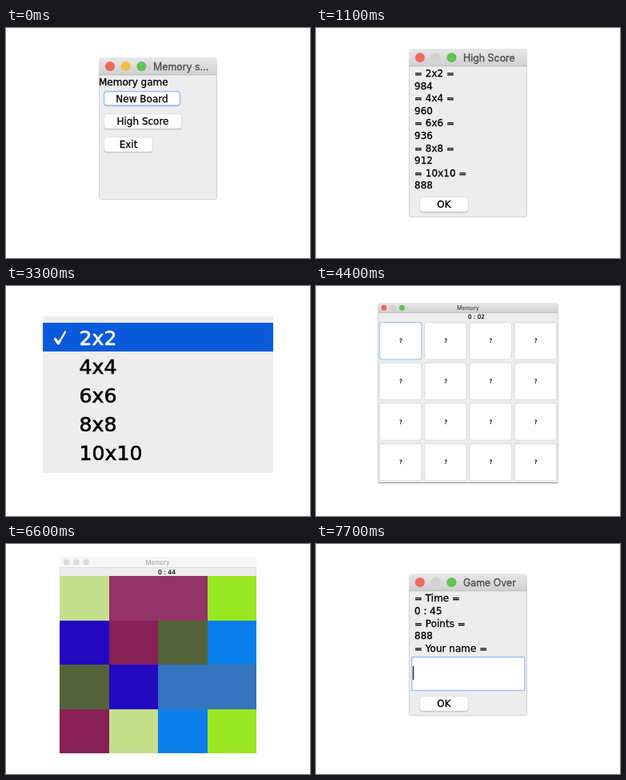
An HTML page with a canvas that plays this animation: 380x288 px, repeating every 8800 ms.

```html
<!DOCTYPE html>
<html lang="en">
<head>
<meta charset="utf-8">
<title>Memory game</title>
<style>
  html, body { margin: 0; width: 100%; height: 100%; overflow: hidden; background: #fff; }
  canvas { display: block; }
</style>
</head>
<body>
<canvas id="stage" width="380" height="288"></canvas>
<script>
const ctx = document.getElementById('stage').getContext('2d');
const SLOT = 1100;
const BODY = '#ededed', RING = '#97c3f5', OFF = '#d1d1d1';
const RED = '#ee6a5f', YELLOW = '#f5bd4f', GREEN = '#61c454';
const UI_FONT = '"DejaVu Sans", sans-serif';
const TITLE_FONT = 'Inter, Roboto, sans-serif';

const PAIRS = ['#c4df8c', '#933366', '#99e622', '#2409c1', '#872055', '#53643a', '#0a7fea', '#3474bc'];
const BOARD = [0, 1, 1, 2, 3, 4, 5, 6, 5, 3, 7, 7, 4, 0, 6, 2];
const SIZES = ['2x2', '4x4', '6x6', '8x8', '10x10'];

// A thin outline gives the interface text its medium weight.
function text(str, x, y, size, { align = 'left', color = '#000', font = UI_FONT } = {}) {
  ctx.font = `${size}px ${font}`;
  ctx.textAlign = align;
  ctx.fillStyle = ctx.strokeStyle = color;
  ctx.lineWidth = size * .025;
  ctx.fillText(str, x, y);
  ctx.strokeText(str, x, y);
}

function rect(x, y, w, h, color) {
  ctx.fillStyle = color;
  ctx.fillRect(x, y, w, h);
}

function box(x, y, w, h, radius, fill, stroke, lineWidth = 1) {
  ctx.beginPath();
  ctx.roundRect(x, y, w, h, radius);
  ctx.fillStyle = fill;
  ctx.fill();
  if (!stroke) return;
  ctx.strokeStyle = stroke;
  ctx.lineWidth = lineWidth;
  ctx.stroke();
}

function line(points, color, width) {
  ctx.beginPath();
  points.forEach(([x, y]) => ctx.lineTo(x, y));
  ctx.strokeStyle = color;
  ctx.lineWidth = width;
  ctx.lineCap = ctx.lineJoin = 'round';
  ctx.stroke();
}

function fade(y, h, from, to) {
  const gradient = ctx.createLinearGradient(0, y, 0, y + h);
  gradient.addColorStop(0, from);
  gradient.addColorStop(1, to);
  return gradient;
}

function windowFrame(x, y, w, h, title, titleX, { scale = 1, lights = [RED, OFF, GREEN], active = true, align } = {}) {
  const bar = 22 * scale, r = 4 * scale;
  box(x + .5, y + .5, w - 1, h - 1, [r, r, 2, 2], BODY, active ? '#d2d2d2' : '#dedede');
  box(x, y, w, bar, [r, r, 0, 0], active ? fade(y, bar, '#e7e7e7', '#d0d0d0') : '#f6f6f6');
  rect(x, y + bar - .5, w, .7, active ? '#b8b8b8' : '#dadada');
  lights.forEach((color, i) => {
    ctx.beginPath();
    ctx.arc(x + (14 + 19.7 * i) * scale, y + 11 * scale, 6.1 * scale, 0, Math.PI * 2);
    ctx.fillStyle = color;
    ctx.fill();
  });
  text(title, titleX, y + 16 * scale, 12.4 * scale,
    { align, color: active ? '#505050' : '#b0b0b0', font: TITLE_FONT });
}

function button(label, x, y, w, h, size = 12, focused = false) {
  box(x + .5, y + 1, w - 1, h - .5, 4, '#c8c8c8');
  box(x + .5, y + .5, w - 1, h - 1.5, 4, '#fff', focused ? RING : '#dadada', focused ? 1.6 : .8);
  text(label, x + w / 2, Math.round(y + h / 2 + size * .34), size, { align: 'center' });
}

function menu() {
  windowFrame(116, 37, 148, 178, 'Memory s...', 184, { lights: [RED, YELLOW, GREEN] });
  text('Memory game', 116, 72, 12);
  button('New Board', 122, 79, 96, 19, 12, true);
  button('High Score', 122, 107, 98, 20);
  button('Exit', 122, 136, 62, 20);
}

function highScore() {
  windowFrame(116, 26, 148, 211, 'High Score', 184);
  SIZES.forEach((size, i) => {
    text(`= ${size} =`, 123, 61 + i * 31.2, 12);
    text(String(984 - i * 24), 123, 76.6 + i * 31.2, 12);
  });
  button('OK', 129, 211, 62, 20);
}

function pickSize() {
  windowFrame(107, 42, 166, 165, 'Pick Size', 183, { scale: 1.11 });
  text('SET SIZE', 200, 80, 13.2, { align: 'center' });
  box(112.5, 117.5, 154, 21.5, 4, '#fff', RING, 1.8);
  box(248, 117.5, 19, 21.5, [0, 4, 4, 0], fade(117, 22, '#60adfb', '#1769f3'));
  line([[254, 125.5], [257.5, 122], [261, 125.5]], '#fff', 1.5);
  line([[254, 131], [257.5, 134.5], [261, 131]], '#fff', 1.5);
  text('2x2', 126, 133, 13.4);
  button('OK', 178, 179, 69, 22, 13.4);
}

function sizeList() {
  rect(46, 38, 288, 196, BODY);
  rect(46, 46, 288, 36, '#085ada');
  line([[61.5, 66.5], [65.5, 72], [74, 57.5]], '#fff', 2.4);
  line([[61.5, 66.5], [65.5, 72], [67, 69]], '#fff', 3.2);
  SIZES.forEach((size, i) =>
    text(size, 91.5, 74 + 36 * i, 25.2, { color: i ? '#000' : '#fff' }));
}

// Whole-pixel edges keep neighbouring tiles free of seams.
function tile(i, left, top, w, h) {
  const col = i % 4, row = i >> 2;
  const x = Math.round(left + col * w), y = Math.round(top + row * h);
  rect(x, y, Math.round(left + (col + 1) * w) - x, Math.round(top + (row + 1) * h) - y, PAIRS[BOARD[i]]);
}

function hiddenBoard(clock, isOpen) {
  windowFrame(77, 21, 226, 226, 'Memory', 190, { scale: .57, align: 'center' });
  line([[78, 246.5], [302, 246.5]], '#8c8c8c', 1);
  text(clock, 200.5, 41, 7.3, { align: 'center' });
  BOARD.forEach((pair, i) => {
    if (isOpen(pair)) {
      tile(i, 77, 44, 56.5, 50.75);
      return;
    }
    const x = 79 + (i % 4) * 56.2, y = 45 + (i >> 2) * 50.6;
    box(x + .5, y + .5, 52.5, 46.5, 3, '#fff', i ? '#d2d2d2' : RING, i ? .8 : 1.2);
    text('?', x + 27, y + 26.3, 7.3, { align: 'center' });
  });
}

function solvedBoard() {
  windowFrame(67, 16, 246, 246, 'Memory', 189.5,
    { scale: .62, lights: Array(3).fill('#dcdcdc'), active: false, align: 'center' });
  text('0 : 44', 201, 37.7, 7.7, { align: 'center' });
  BOARD.forEach((_, i) => tile(i, 67, 40, 61.5, 55.5));
}

function gameOver() {
  windowFrame(116, 37, 148, 178, 'Game Over', 184);
  ['= Time =', '0 : 45', '= Points =', '888', '= Your name =']
    .forEach((row, i) => text(row, 123, Math.round(72 + i * 15.8), 12));
  box(119.8, 141.5, 141, 42, 1, '#fff', RING, 1.4);
  rect(121, 153, 1, 17, '#000');
  button('OK', 129, 190, 62, 20);
}

const scenes = [
  menu,
  highScore,
  pickSize,
  sizeList,
  () => hiddenBoard('0 : 02', () => false),
  () => hiddenBoard('0 : 23', pair => [0, 2, 3, 4].includes(pair)),
  solvedBoard,
  gameOver
];

const start = performance.now();
function render() {
  const elapsed = Math.max(0, performance.now() - start);
  rect(0, 0, 380, 288, '#fff');
  scenes[Math.floor(elapsed / SLOT) % scenes.length]();
  requestAnimationFrame(render);
}
render();
</script>
</body>
</html>
```
